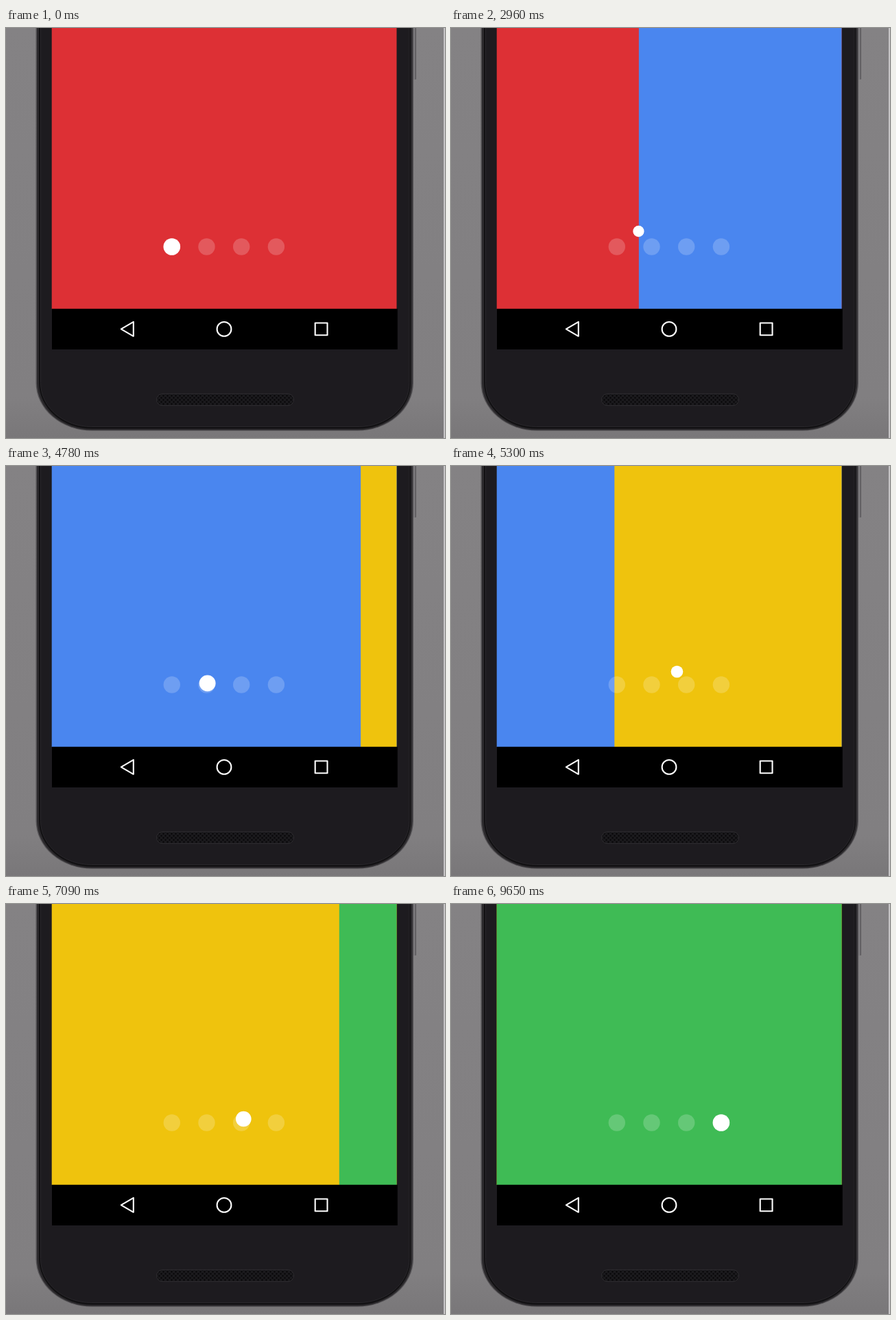
An HTML page that plays this animation: 640x597 px, repeating every 9.69 s.

```html
<!DOCTYPE html>
<html lang="en">
<head>
<meta charset="utf-8">
<title>Page indicator</title>
<style>
  html, body { margin: 0; width: 100%; height: 100%; overflow: hidden; background: #817f81; }
  svg { display: block; width: 100vw; height: 100vh; }
</style>
</head>
<body>
<svg viewBox="0 0 640 597" preserveAspectRatio="none">
  <defs>
    <linearGradient id="wall" x2="0" y2="1">
      <stop offset="0" stop-color="#848284"/>
      <stop offset=".9" stop-color="#817f81"/>
      <stop offset="1" stop-color="#797779"/>
    </linearGradient>
    <pattern id="mesh" width="6" height="6" patternUnits="userSpaceOnUse">
      <rect width="6" height="6" fill="#1b1a1d"/>
      <circle cx="1.5" cy="1.5" r="1.3" fill="#080709"/>
      <circle cx="4.5" cy="4.5" r="1.3" fill="#080709"/>
    </pattern>
    <clipPath id="screen"><rect x="66.7" y="0" width="502.8" height="409"/></clipPath>
  </defs>

  <rect width="640" height="597" fill="url(#wall)"/>
  <rect x="638" width="2" height="597" fill="#c6c4c6"/>

  <g id="phone">
    <rect x="594" y="-10" width="4" height="85" rx="1" fill="#5b595c"/>
    <rect x="594" y="-10" width="2.5" height="85" fill="#7b797c"/>
    <rect x="43.5" y="-100" width="550.5" height="686.5" rx="82" ry="70" fill="#545255"/>
    <rect x="45" y="-100" width="547.5" height="685.5" rx="80" ry="69" fill="#2b292c"/>
    <rect x="48" y="-100" width="542" height="683.5" rx="77" ry="67" fill="#121113"/>
    <rect x="50.5" y="-100" width="537.5" height="680.5" rx="74" ry="64" fill="#1d1b1f" stroke="#29272b"/>
    <rect x="219.5" y="532.7" width="200" height="17" rx="8.5" fill="url(#mesh)" stroke="#2f2d31"/>
  </g>

  <g clip-path="url(#screen)">
    <rect id="under" x="66" width="504" height="409"/>
    <rect id="over" width="504" height="409"/>
  </g>
  <g fill="#fff" fill-opacity=".2">
    <circle cx="241.8" cy="318.5" r="12.2"/>
    <circle cx="292.5" cy="318.5" r="12.2"/>
    <circle cx="343.2" cy="318.5" r="12.2"/>
    <circle cx="393.9" cy="318.5" r="12.2"/>
  </g>
  <circle id="dot" fill="#fff"/>

  <rect x="67" y="408.8" width="503.8" height="59.2"/>
  <g fill="none" stroke="#fff" stroke-width="2.1" stroke-linejoin="round">
    <path d="M167.8 438.3 185.8 427.8V448.8Z"/>
    <circle cx="318" cy="438.4" r="10.4"/>
    <rect x="450.7" y="429.5" width="17.8" height="17.8"/>
  </g>
</svg>
<script>
  const LOOP = 9690, SLIDE = 1278;
  const STARTS = [2246, 4524, 6759];
  const COLORS = ['#dd3035', '#4a86ef', '#efc30d', '#3fbb55'];
  const LEFT = 67, WIDTH = 503, FIRST = 241.8, GAP = 50.7;

  const [under, over, dot] = ['under', 'over', 'dot'].map(id => document.getElementById(id));
  const clamp = v => Math.min(1, Math.max(0, v));
  const ease = u => u * u * (3 - 2 * u);
  const set = (el, attrs) => {
    for (const name in attrs) el.setAttribute(name, attrs[name]);
  };

  function draw(t) {
    const pos = STARTS.reduce((sum, start) => sum + ease(clamp((t - start) / SLIDE)), 0);
    const page = Math.min(Math.floor(pos), COLORS.length - 2);
    const p = pos - page;
    set(under, { fill: COLORS[page] });
    set(over, { fill: COLORS[page + 1], x: p < 1 ? LEFT + WIDTH * (1 - p) : 66 });

    // The dot hops to the next place, slightly late, and shrinks at the top of its arc.
    const angle = Math.PI * p ** 1.03;
    const lift = Math.sin(angle) ** 2;
    set(dot, {
      cx: FIRST + GAP * (page + (1 - Math.cos(angle)) / 2),
      cy: 318.5 - 24 * lift,
      r: 12.3 - 4.4 * lift
    });
  }

  const origin = performance.now();
  function tick() {
    draw((performance.now() - origin) % LOOP);
    requestAnimationFrame(tick);
  }
  tick();
</script>
</body>
</html>
```
